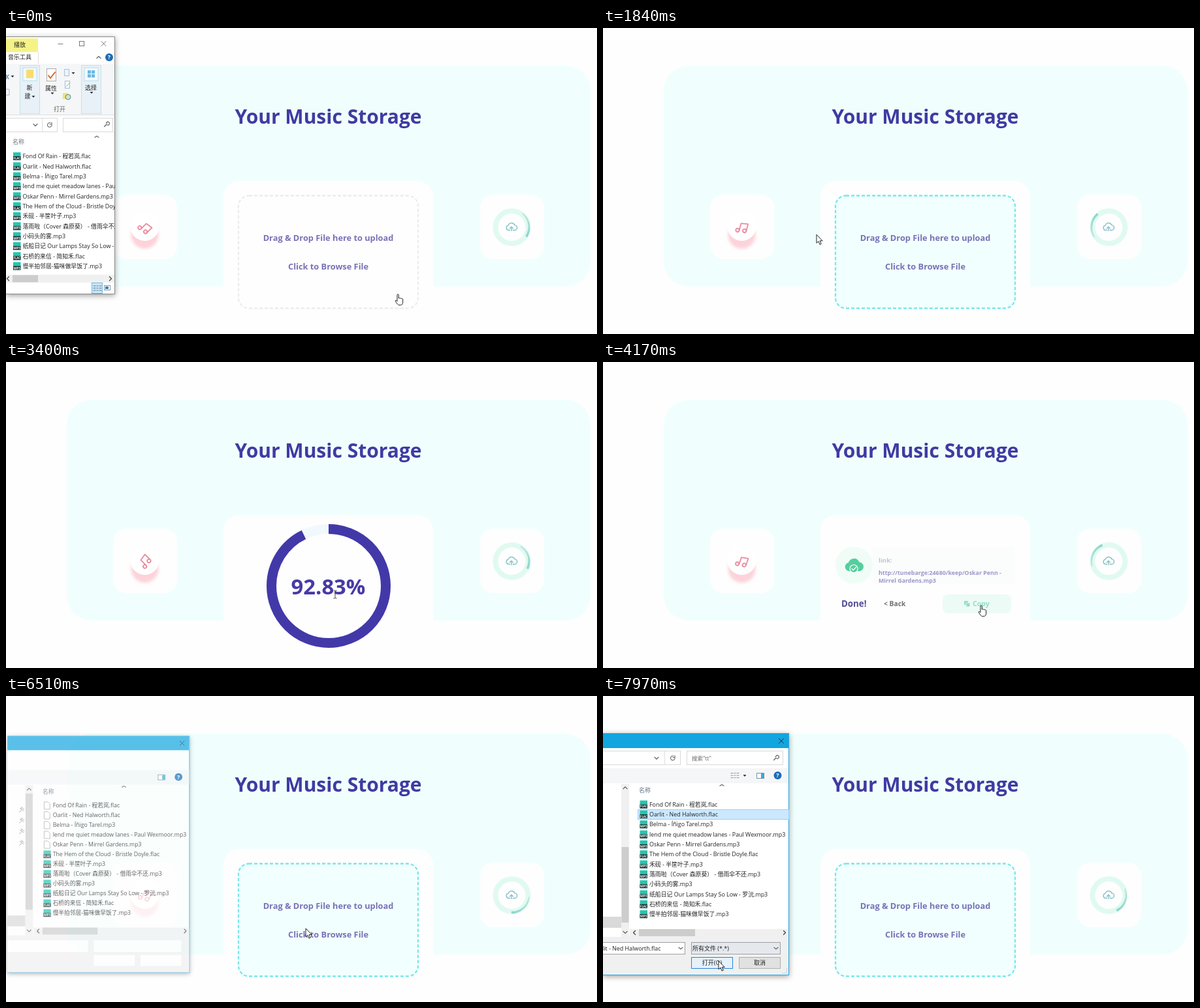
An HTML page for the animation above (8000 ms loop, 905 by 470 pixels).

```html
<!DOCTYPE html>
<html lang="en">
<head>
<meta charset="utf-8">
<title>Music storage</title>
<style>
html, body { margin: 0; width: 100%; height: 100%; overflow: hidden; background: #fefefe; }
#stage { display: block; width: 905px; height: 470px; }
text { font-family: "Open Sans", "Noto Sans CJK SC", "Noto Sans CJK", sans-serif; white-space: pre; }
.shadow { filter: drop-shadow(0 2px 4px rgba(0, 0, 0, .38)); }
.line { fill: none; stroke-linecap: round; stroke-linejoin: round; }
</style>
</head>
<body>
<svg id="stage" viewBox="0 0 905 470" xmlns="http://www.w3.org/2000/svg"></svg>
<script>
const LOOP = 8000;
const ROW = 15.33;
const FILES = [
  'Fond Of Rain - 程若岚.flac', 'Oarlit - Ned Halworth.flac', 'Belma - Íñigo Tarel.mp3',
  'lend me quiet meadow lanes - Paul Wexmoor.mp3', 'Oskar Penn - Mirrel Gardens.mp3',
  'The Hem of the Cloud - Bristle Doyle.flac', '禾砚 - 半筐叶子.mp3',
  '落雨啦（Cover 森原葵） - 借雨伞不还.mp3', '小码头的雾.mp3',
  '纸船日记 Our Lamps Stay So Low - 罗沅.mp3', '石桥的来信 - 简知禾.flac',
  '慢半拍邻居-猫咪做早饭了.mp3'
];

// Markup helpers
const text = (x, y, s, size = 9, fill = '#222', extra = '') =>
  `<text x="${x}" y="${y}" font-size="${size}" fill="${fill}" ${extra}>${s}</text>`;
const rect = (x, y, w, h, fill, extra = '') =>
  `<rect x="${x}" y="${y}" width="${w}" height="${h}" fill="${fill}" ${extra}/>`;
const circle = (x, y, r, fill, extra = '') =>
  `<circle cx="${x}" cy="${y}" r="${r}" fill="${fill}" ${extra}/>`;
const line = (d, stroke = '#555', width = 1, extra = '') =>
  `<path class="line" d="${d}" stroke="${stroke}" stroke-width="${width}" ${extra}/>`;
const box = (x, y, w, h, stroke, fill = '#fff') =>
  rect(x + .5, y + .5, w - 1, h - 1, fill, `stroke="${stroke}"`);
const chevron = (x, y, dx, dy) => dx
  ? line(`M${x - dx} ${y - 3}L${x + dx} ${y}L${x - dx} ${y + 3}`, '#444', 1.3)
  : line(`M${x - 3} ${y - dy}L${x} ${y + dy}L${x + 3} ${y - dy}`, '#666', 1.2);
const caret = (x, y) => `<path d="M${x - 2.5} ${y - 1}h5l-2.5 3z" fill="#333"/>`;
const refresh = (x, y) => line(`M${x + 3} ${y - 1}a3.3 3.3 0 1 1-2-2.2M${x + 3} ${y - 4}v3h-3`, '#666', 1.1);
const magnifier = (x, y) => line(`M${x - 3.5} ${y + 3.5}l3-3m0-1.5a2.5 2.5 0 1 1 1.2 1.8`, '#555', 1.1);
const cross = (x, y, stroke) => line(`M${x - 3.5} ${y - 3.5}l7 7m0-7l-7 7`, stroke);
const help = (x, y) => circle(x, y, 6, '#1a6cb8') + text(x, y + 3.3, '?', 9, '#fff', 'text-anchor="middle" font-weight="700"');
const bold = 'font-weight="700"';
const middle = 'text-anchor="middle"';

function fileIcon(x, y, name) {
  const kind = name.endsWith('flac') ? 'FLAC' : 'MP3';
  return rect(x, y - 6, 11.5, 12, '#25c5b0') + rect(x, y, 11.5, 6, '#1c2526') +
    text(x + 5.8, y + 4.9, kind, kind === 'MP3' ? 5 : 4.4, '#fff', `${middle} ${bold}`);
}
const pageIcon = (x, y) =>
  rect(x - 1, y - 7, 14, 14, '#fff') +
  `<path d="M${x + 1.5} ${y - 5.5}h6l3 3v8.500h-9z" fill="#fff" stroke="#aaa"/>`;
const fileRows = (x, y) => FILES.map((name, i) =>
  fileIcon(x, y + i * ROW, name) + text(x + 14.5, y + i * ROW + 3.3, name, 8.9)).join('');

function explorer() {
  const group = x => box(x, 57, 31, 75, '#c9dfec', '#e7f1f7') + rect(x + 5, 61, 21, 20, '#f1fafd', 'stroke="#b8dcee"');
  return `<g id="explorer"><g class="shadow"><svg x="0" y="13" width="167" height="396" viewBox="0 13 167 396">` +
    rect(-2, 13.5, 168.5, 395, '#fff', 'stroke="#8b8b8b"') +
    rect(0, 16, 49, 21, '#f5f385') + text(12, 29.3, '播放') +
    line('M80 24.5h7', '#777') + box(112, 20, 8, 8, '#777') + cross(149.5, 24, '#777') +
    text(3, 48.3, '音乐工具') + line('M49.500 37v18', '#ddd') + chevron(142, 45, 0, -1.5) + help(158, 45) +
    rect(0, 55, 166, 78, '#f5f6f7') + line('M0 133.500h166', '#dadbdc') +
    line('M0 72l4 6m0-6l-4 6', '#8494a5', 1.4) + caret(10, 74) + line('M0 94h5v9h-5', '#a5b8c8') +
    group(21) + group(115) +
    rect(31, 64, 11, 13, '#f9dc70') +
    text(36, 95, '新', 9, '#222', middle) + text(33, 108, '建', 9, '#222', middle) + caret(42, 105) +
    box(62, 62, 15, 20, '#aaa') + line('M65 73l3 4 7-9', '#dd641e', 2) +
    text(69, 96, '属性', 9, '#222', middle) + caret(71, 100) +
    box(89, 63, 8, 11, '#a9c2d3', '#edf4f8') + caret(103, 69) +
    box(90, 81, 8, 12, '#9fbdd3') + line('M92 90l6-6', '#86b5a4') +
    rect(87, 100, 8, 9, '#f8df74') + circle(95, 106, 4, '#cfe3d2', 'stroke="#61897a"') +
    [0, 1, 2, 3].map(i => rect(125 + i % 2 * 6, 65 + (i >> 1) * 6, 5, 5, '#6ab8e5')).join('') +
    text(130, 95, '选择', 9, '#222', middle) + caret(131, 99) +
    text(82, 128, '打开', 9, '#666', middle) +
    box(-2, 138, 81, 22, '#d9d9d9') + line('M55.500 139v20', '#ddd') + chevron(45, 149, 0, 1.5) + refresh(67, 149) +
    box(87, 138, 77, 22, '#d9d9d9') + magnifier(154, 148) +
    chevron(139, 167, 0, -1) + text(10, 178.3, '名称', 9, '#6d7681') +
    rect(8, 0, 158, 15, '#e5f3ff', 'id="explorerHover"') + fileRows(11, 197) +
    rect(0, 379, 166, 12, '#f0f0f0') + rect(10, 379.500, 39, 11, '#cdcdcd') +
    chevron(3, 385, -1.5) + chevron(160, 385, 1.5) +
    box(131, 391, 17, 17, '#70b6dd', '#cce8f7') +
    [396, 399.500, 403].map(y => line(`M134 ${y}h3m2 0h2m2 0h3`, '#50728b')).join('') +
    box(150, 395, 10, 8, '#8798a5') + rect(152, 397, 5, 4, '#427fad') +
    '</svg></g></g>';
}

function dialog() {
  const combo = (x, y, w, fill = '#fff') => box(x, y, w, 19, '#9b9fa3', fill) + chevron(x + w - 7, y + 9.500, 0, 1.3);
  const pins = [173, 190, 207, 225].map(y => line(`M19 ${y + 4}l3-3m-2-3l5 4m-3-6l4 4m-5-1l2-2`, '#888')).join('');
  return `<g id="dialog"><g class="shadow"><svg x="0" y="57" width="286" height="373" viewBox="0 57 286 373">` +
    rect(-2, 57.5, 286.5, 371, '#fff', 'stroke="#2aa3dc"') + rect(0, 58, 284, 22, '#12a5e0') + cross(273, 69, '#183040') +
    rect(0, 111, 284, 23, '#f5f6f7') +
    box(235, 118, 12, 9, '#7b929f') + rect(242, 119, 4, 7, '#3ca7d9') + help(267.5, 122) +
    rect(28, 135, 12, 235, '#f0f0f0') + rect(28.5, 232, 11, 116, '#cdcdcd', 'id="navThumb"') +
    chevron(34, 141, 0, -1.5) + chevron(34, 363, 0, 1.5) + rect(0, 339, 28, 17, '#d9d9d9') +
    chevron(182, 137, 0, -1) + text(55, 148.3, '名称', 9, '#607386') +
    rect(53, 0, 231, 15, '#e5f3ff', 'id="dialogHover"') +
    `<g id="picked">${box(53, 174, 232, 16, '#99d1ff', '#cce8ff')}</g>` + fileRows(56.500, 166.5) +
    `<g id="loading">${FILES.slice(0, 5).map((_, i) => pageIcon(56, 166.5 + i * ROW)).join('')}${pins}</g>` +
    rect(41, 358, 243, 12, '#f0f0f0') + rect(55, 358, 86, 11, '#cdcdcd') + chevron(48, 363.500, -1.5) + chevron(278, 363.500, 1.5) +
    rect(0, 370, 284, 58, '#f0f0f0') +
    rect(0, 378, 126, 18, '#fff') + rect(135, 378, 137, 18, '#fff') + rect(135, 401, 64, 17, '#fff') + rect(208, 401, 64, 17, '#fff') +
    '<g id="controls">' +
    box(-2, 84, 121, 22, '#d9d9d9') + line('M94.500 85v20', '#ddd') + chevron(82, 95.5, 0, 1.5) + refresh(107, 95.5) +
    box(128, 84, 148, 22, '#d9d9d9') + text(136, 98.500, '搜索"tt"', 8.5, '#666') + magnifier(265, 95) +
    [118.5, 122, 125.5].map(y => line(`M196 ${y}h3m2 0h2m2 0h3`, '#8a949b')).join('') + caret(217, 122) +
    combo(-2, 378, 128) + combo(135, 378, 137, '#e5e9ee') + text(137, 390.500, '所有文件 (*.*)') +
    box(135, 401, 64, 18, '#2685d5', '#e5f1fb') + text(167, 412.8, '打开(O)', 9, '#222', middle) +
    box(208, 401, 64, 18, '#adadad', '#e1e1e1') + text(240, 412.8, '取消', 9, '#222', middle) +
    [0, 3, 6].map(i => rect(281 - i, 425, 1, 1, '#999') + rect(281, 425 - i, 1, 1, '#999')).join('') +
    '</g>' + text(-1, 390.500, 'lit - Ned Halworth.flac', 8.9, '#222', 'id="fileName"') + '</svg></g></g>';
}

function spinnerArc() {
  const point = a => `${26.5 * Math.sin(a)} ${-26.5 * Math.cos(a)}`;
  return Array.from({ length: 14 }, (_, i) => {
    const a = -.74 + i * .106;
    return `<path d="M${point(a)}A26.5 26.5 0 0 1 ${point(a + .112)}" fill="none" stroke="#8bd5ca" stroke-width="${1.8 + i * .14}" opacity="${.5 + i * .038}"/>`;
  }).join('');
}

const cloud = 'M7 18a4.500 4.500 0 0 1-.6-8.9A6 6 0 0 1 17.8 8.6A4.700 4.700 0 0 1 17.5 18';

function page() {
  return rect(93, 58, 802, 339, '#f0fffe', 'rx="38"') +
    rect(333, 235, 321, 250, '#fefefe', 'rx="24"') +
    text(493.500, 146.5, 'Your Music Storage', 30, '#3f3ba2', `${bold} ${middle}`) +
    rect(164, 256, 98, 99, '#fefefe', 'rx="20"') + rect(726, 256, 98, 99, '#fefefe', 'rx="20"') +
    `<circle cx="212.5" cy="318" r="21" fill="#fcd3da" style="filter:blur(2px)"/>` + circle(212.5, 305, 22, '#fff') +
    `<g id="note"><g transform="translate(212.5 306.5) scale(.88) translate(-12 -11.7)">` +
    line('M9 18V5l12-2v13', '#ea8c9f', 2.1) + circle(6, 18, 3, 'none', 'stroke="#ea8c9f" stroke-width="2.1"') +
    circle(18, 16, 3, 'none', 'stroke="#ea8c9f" stroke-width="2.1"') + '</g></g>' +
    circle(774.5, 306, 25, '#fefefe', 'stroke="#e1faf1" stroke-width="8"') +
    `<g id="spinner">${spinnerArc()}</g>` +
    `<g transform="translate(774 306) scale(.84) translate(-12 -12.500)">${line(cloud + 'M7 18h2m6 0h2.500M12 19v-7m-3 2.500l3-3 3 3', '#8cc3cb', 1.8)}</g>`;
}

function uploadViews() {
  return '<g id="drop"><rect id="zone" stroke-dasharray="5 3"/>' +
    text(493.500, 0, 'Drag &amp; Drop File here to upload', 12.8, '#7972b7', `id="dragLabel" ${bold} ${middle}`) +
    text(493.500, 0, 'Click to Browse File', 12.8, '#7972b7', `id="clickLabel" ${bold} ${middle}`) + '</g>' +
    '<g id="progress">' + circle(494, 344, 87.5, 'none', 'stroke="#f2f9fe" stroke-width="15"') +
    circle(494, 344, 87.5, 'none', 'id="arc" pathLength="100" stroke="#4338a8" stroke-width="15" transform="rotate(-90 494 344)"') +
    text(493.500, 356.500, '', 32.8, '#473aa6', `id="percent" ${bold} ${middle}`) + '</g>' +
    '<g id="done">' + rect(413, 284, 218, 57, '#fbfcfc', 'rx="4"') + circle(384.5, 312, 28.5, '#effdf6') +
    `<path transform="translate(384 311) scale(1.45) translate(-12 -11)" d="${cloud}z" fill="#55ce9e"/>` +
    circle(384, 317.500, 6, '#55ce9e', 'stroke="#fff" stroke-width="1.2"') + line('M381 317.500l2.300 2.300 4-4.500', '#fff', 1.3) +
    text(422, 307.500, 'link:', 9.6, '#c3c3ca', bold) +
    text(422, 327.300, 'http://tunebarge:24680/keep/Oskar Penn -', 8.9, '#9c96cb', bold) +
    text(422, 339.300, 'Mirrel Gardens.mp3', 8.9, '#9c96cb', bold) +
    text(365, 376, 'Done!', 13.3, '#514c96', bold) + text(430, 375, '&lt; Back', 10.3, '#707075', bold) +
    '<g id="copy">' + rect(520, 357, 105, 29, '#e4fbf2', 'rx="8"') +
    rect(553, 367, 6, 6, '#68cfa8', 'rx="1"') + rect(556, 370, 6, 6, '#68cfa8', 'rx="1" stroke="#e4fbf2" stroke-width=".8"') +
    text(566, 375.300, 'Copy', 10.6, '#68cfa8', bold) + '</g></g>';
}

const cursors = '<g id="cursor">' +
  '<path id="arrow" d="M0 0v13l3-2.800 2 5 2.200-1-2-4.700h4z" fill="#fff" stroke="#222"/>' +
  '<path id="hand" d="M-1 1.200c0-1.800 2.300-1.800 2.300 0v5c.6-1 2-.8 2.200.2.700-.8 2-.5 2.200.5.800-.6 2-.2 2 .9v4.200c0 2.500-1.200 4.500-3.200 4.500H1.800C0 16.500-1 14.500-3.500 11c-.9-1.300.5-2.300 1.500-1.300l1 1z" fill="#fff" stroke="#222"/>' +
  '<path id="beam" d="M-2.500-6h2l.5.500.5-.5h2M0-5.500v11M-2.500 6h2l.5-.5.5.5h2" fill="none" stroke="#444" stroke-width="1"/></g>';

const stage = document.getElementById('stage');
stage.innerHTML = page() + uploadViews() + explorer() + dialog() + cursors;
const el = {};
stage.querySelectorAll('[id]').forEach(node => { el[node.id] = node; });

// Tables: time, then values
const CURSOR = [
  [0, 600, 409], [80, 600, 409], [760, 66, 262], [1150, 59, 257], [1300, 59, 257], [2250, 503, 357],
  [3480, 504, 357], [4020, 579, 374], [4450, 579, 374], [4900, 459, 374], [5250, 459, 374],
  [5700, 459, 357], [6620, 459, 357], [7250, 108, 184], [7560, 108, 184], [7740, 130, 280], [7930, 177, 407]
];
const CURSOR_KIND = [
  [0, 'hand'], [140, 'arrow'], [2630, 'beam'], [3560, 'arrow'], [3900, 'hand'],
  [4540, 'arrow'], [4780, 'hand'], [5950, 'arrow']
];
const SPIN = [[0, 80], [1230, 410], [2630, 930], [4170, 1375], [5180, 1880], [6510, 2298], [7970, 2630]];

const clamp = v => Math.min(1, Math.max(0, v));
const progress = (t, from, to) => clamp((t - from) / (to - from));
const easeOut = p => 1 - (1 - p) ** 2;
const smooth = p => p * p * (3 - 2 * p);
const mix = (a, b, p) => a + (b - a) * p;

function at(table, t, ease = p => p) {
  const i = table.findLastIndex(row => row[0] <= t);
  const a = table[i], b = table[i + 1] || a;
  const p = a === b ? 0 : ease((t - a[0]) / (b[0] - a[0]));
  return a.slice(1).map((v, k) => mix(v, b[k + 1], p));
}
const set = (node, attrs) => Object.entries(attrs).forEach(([k, v]) => node.setAttribute(k, v));
const show = (node, on) => set(node, { visibility: on ? 'inherit' : 'hidden' });
const scaleAt = (x, y, s) => `translate(${x} ${y}) scale(${s}) translate(${-x} ${-y})`;

function hoverRow(node, first, inside, y, skip) {
  const i = Math.round((y - first) / ROW);
  show(node, inside && i >= 0 && i < FILES.length && i !== skip);
  set(node, { y: first + i * ROW - 7.5 });
}

function drawZone(t) {
  const back = t >= 5180;
  const grow = back ? easeOut(progress(t, 5180, 5500)) : 1;
  const w = mix(256, 275, grow), h = mix(161, 173, grow), gap = mix(20, 22, grow);
  const active = back || t >= 1800;
  set(el.zone, {
    x: 493.500 - w / 2, y: 344 - h / 2, width: w, height: h, rx: 16,
    fill: active ? '#f1fffe' : '#fefefe',
    stroke: active ? `rgb(${mix(112, 120, grow)},${mix(207, 232, grow)},${mix(208, 234, grow)})` : '#eaecee',
    'stroke-width': mix(1.6, 2.3, grow)
  });
  set(el.dragLabel, { y: 349 - gap });
  set(el.clickLabel, { y: 349 + gap });
}

function drawProgress(t) {
  const value = Math.min(100, 9.56 + (t - 2630) * .108);
  set(el.arc, { 'stroke-dasharray': `${value} 200` });
  el.percent.textContent = `${value.toFixed(2)}%`;
}

function draw(t) {
  const [x, y] = at(CURSOR, t, smooth);
  const kind = CURSOR_KIND.findLast(row => row[0] <= t)[1];
  set(el.cursor, { transform: `translate(${x} ${y})` });
  ['arrow', 'hand', 'beam'].forEach(name => show(el[name], name === kind));

  set(el.note, { transform: `rotate(${45 * Math.cos(t / 2290 * 2 * Math.PI)} 212.5 306.5)` });
  set(el.spinner, { transform: `translate(774.5 306) rotate(${at(SPIN, t)[0]})` });

  show(el.drop, t < 2630 || t >= 5180);
  show(el.progress, t >= 2630 && t < 3560);
  show(el.done, t >= 3560 && t < 5180);
  set(el.copy, { opacity: t > 3900 && t < 4540 ? .68 : 1 });
  drawZone(t);
  drawProgress(t);

  const closing = progress(t, 1620, 1820);
  show(el.explorer, closing < 1);
  set(el.explorer, { opacity: 1 - closing, transform: scaleAt(83, 211, 1 - .06 * closing) });
  const dragging = t >= 1300;
  hoverRow(el.explorerHover, 197, dragging || x < 166, dragging ? 258 : y);
  set(el.explorerHover, { fill: dragging ? '#cce8ff' : '#e5f3ff' });

  const opening = easeOut(progress(t, 6440, 6600));
  const picked = t >= 7400;
  show(el.dialog, t >= 6440);
  set(el.dialog, { opacity: opening, transform: scaleAt(103, 243, mix(.935, 1, opening)) });
  show(el.loading, t < 6600);
  show(el.controls, t >= 6600);
  show(el.fileName, picked);
  show(el.picked, picked);
  set(el.navThumb, t < 6600 ? { y: 148, height: 182 } : { y: 232, height: 116 });
  hoverRow(el.dialogHover, 166.5, x > 53 && x < 284, y, picked ? 1 : -1);
}

function tick() {
  draw(performance.now() % LOOP);
  requestAnimationFrame(tick);
}
tick();
</script>
</body>
</html>
```
